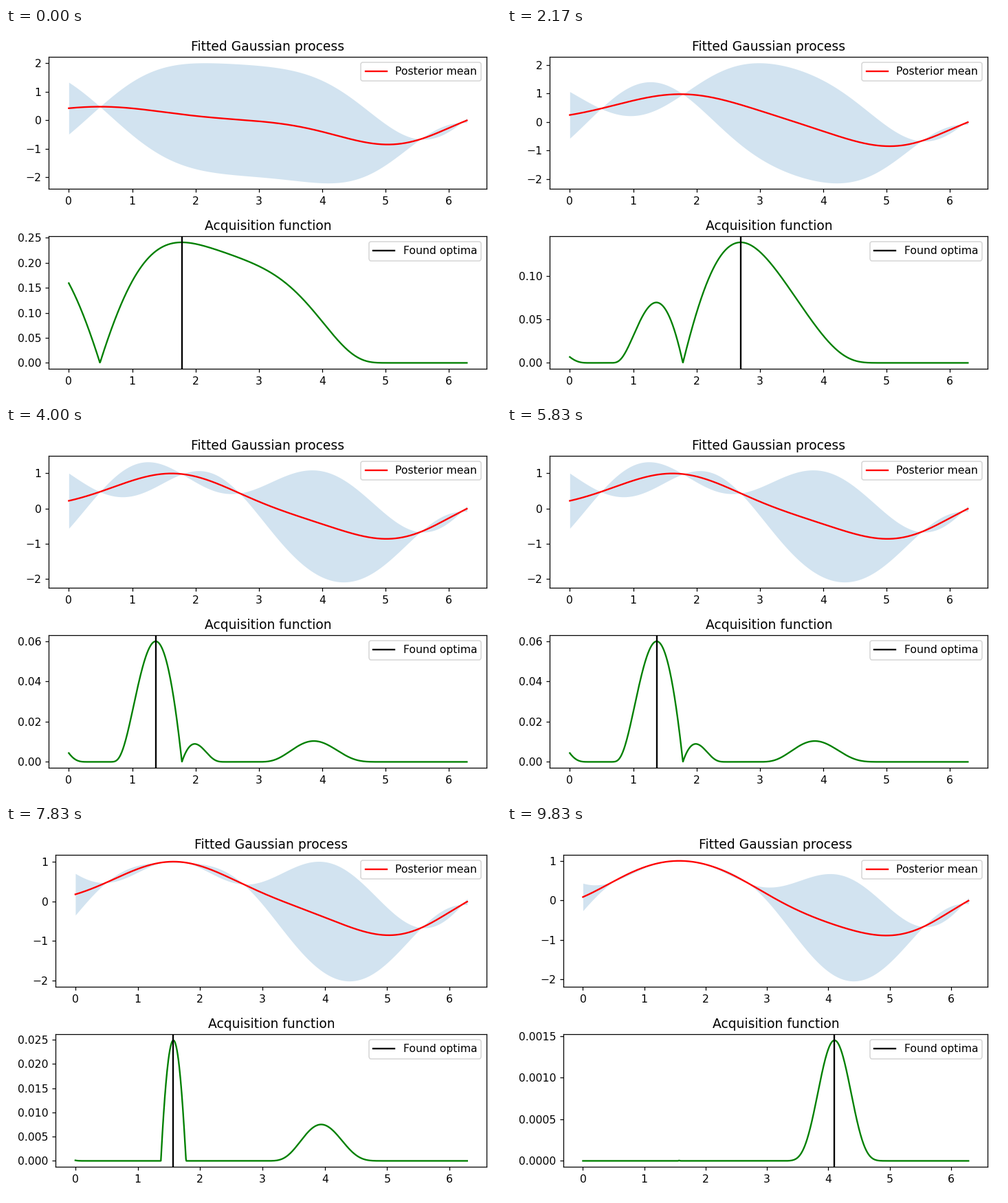
These frames come from a looping animation (720 px wide and 540 px high, 9990 ms). A matplotlib script:

```python
import math

import matplotlib.pyplot as plt
import numpy as np
from matplotlib.animation import FuncAnimation

W, H, DPI = 720, 540, 112.5
LOOP_MS = 9990

# Bayesian optimisation of sin(x): first samples, then one query per step
START = [0.492, 5.55, 6.2]
QUERIES = [1.785, 2.693, 1.371, 1.571, 4.1]
PEAKS = [0.241, 0.1386, 0.0599, 0.02486, 0.001448]
LEFTS = [62.4, 62.4, 62.4, 72.4, 82.4]
RIGHT = 699.3

grid = np.linspace(0, 2 * np.pi, 1000)
erf = np.vectorize(math.erf)


def kernel(a, b):
    return np.exp(-0.5 * (a[:, None] - b[None, :]) ** 2)


def posterior(x):
    K = kernel(x, x) + 1e-11 * np.eye(len(x))
    k = kernel(x, grid)
    gain = np.linalg.solve(K, k)
    var = 1 - np.sum(k * gain, axis=0)
    return gain.T @ np.sin(x), np.sqrt(np.maximum(var, 1e-12))


def expected_improvement(mean, std, best):
    z = (mean - best) / std
    pdf = np.exp(-z**2 / 2) / math.sqrt(2 * math.pi)
    cdf = 0.5 * (1 + erf(z / math.sqrt(2)))
    return np.maximum(std * (pdf + z * cdf), 0)


def solve_step(i):
    x = np.array(START + QUERIES[:i])
    mean, std = posterior(x)
    ei = expected_improvement(mean, std, np.sin(x).max())
    return mean, std, ei * PEAKS[i] / ei.max()


steps = [solve_step(i) for i in range(len(QUERIES))]

fig = plt.figure(figsize=(W / DPI, H / DPI), dpi=DPI, facecolor="white")


def add_panel(left, top, bottom, title):
    box = [left / W, 1 - bottom / H, (RIGHT - left) / W, (bottom - top) / H]
    ax = fig.add_axes(box)
    ax.set_title(title)
    return ax


def draw(i):
    fig.clear()
    mean, std, ei = steps[i]

    ax = add_panel(LEFTS[i], 42, 234.4, "Fitted Gaussian process")
    ax.plot(grid, mean, color="red", label="Posterior mean")
    ax.fill_between(grid, mean - 1.96 * std, mean + 1.96 * std,
                    color="C0", alpha=0.2, linewidth=0)
    ax.legend(loc="upper right")

    ax = add_panel(LEFTS[i], 303.2, 496.2, "Acquisition function")
    ax.plot(grid, ei, color="green")
    ax.axvline(QUERIES[i], color="black", label="Found optima")
    ax.legend(loc="upper right")
    return []


anim = FuncAnimation(fig, draw, frames=len(steps), init_func=lambda: draw(0),
                     interval=LOOP_MS / len(steps), repeat=True,
                     repeat_delay=0, blit=False)
plt.show()
```
